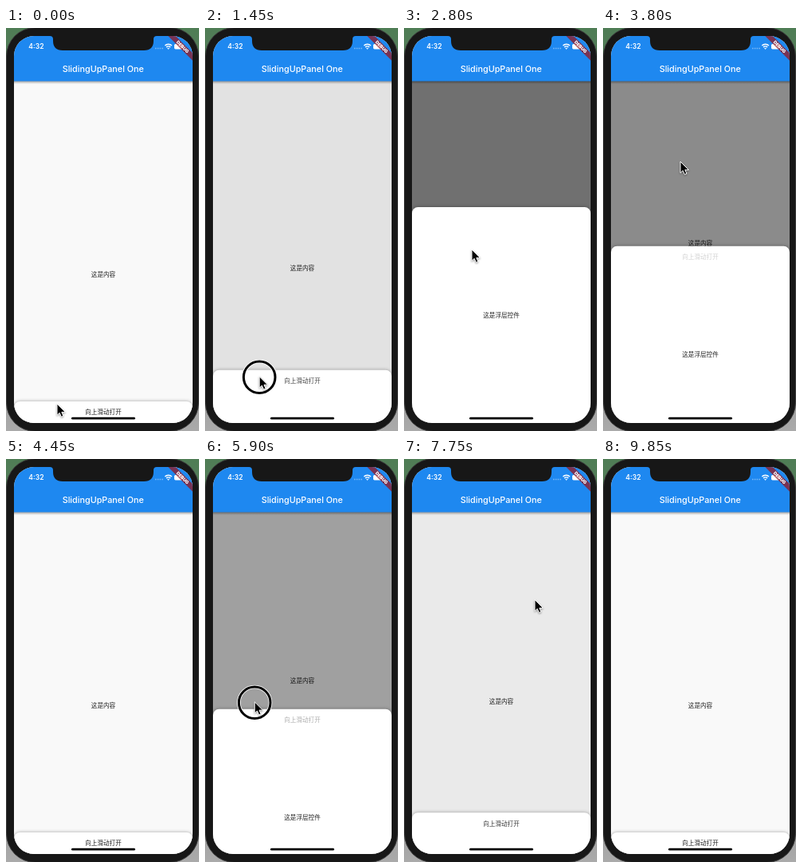
An HTML page that plays this animation: 242 by 504 pixels, repeating every 9.9 s.

```html
<!DOCTYPE html>
<html lang="zh-CN">
<head>
<meta charset="utf-8">
<title>SlidingUpPanel One</title>
<style>
  html, body { margin: 0; width: 100%; height: 100%; overflow: hidden; }
  svg { display: block; width: 242px; height: 504px; }
  text { font: 7.6px "Noto Sans CJK SC", "Noto Sans CJK", sans-serif; fill: #222; text-anchor: middle; }
  .latin { font-family: Inter, sans-serif; fill: #fff; }
  #sheet { filter: drop-shadow(0 0 2px rgba(0, 0, 0, .35)); }
  #arrow { filter: drop-shadow(0 1px 1px rgba(0, 0, 0, .4)); }
</style>
</head>
<body>
<svg viewBox="0 0 242 504">
  <defs>
    <linearGradient id="desk" x2="0" y2="1">
      <stop stop-color="#4f7d55"/><stop offset=".5" stop-color="#777"/><stop offset="1" stop-color="#aaa"/>
    </linearGradient>
    <linearGradient id="shade" x2="0" y2="1">
      <stop stop-opacity=".38"/><stop offset="1" stop-opacity="0"/>
    </linearGradient>
    <clipPath id="screen"><rect x="10" y="10" width="224" height="484" rx="25"/></clipPath>
  </defs>

  <rect width="242" height="504" fill="url(#desk)"/>
  <rect x=".5" y="-.5" width="241" height="505" rx="36" fill="#171717" stroke="#3c3c3c"/>

  <g clip-path="url(#screen)">
    <rect x="10" y="10" width="224" height="484" fill="#f9f9f9"/>
    <text id="content" x="122">这是内容</text>
    <rect id="backdrop" x="10" y="66" width="224" height="428"/>
    <g id="panel">
      <rect id="sheet" x="10" width="224" height="290" rx="7.5" fill="#fff"/>
      <text x="122" y="138">这是浮层控件</text>
      <text id="hint" x="122" y="16.3">向上滑动打开</text>
    </g>

    <rect x="10" y="66" width="224" height="4" fill="url(#shade)"/>
    <rect x="10" y="10" width="224" height="56.5" fill="#1e88f0"/>
    <text class="latin" x="121.8" y="54.9" style="font-size:10.8px;font-weight:500">SlidingUpPanel One</text>
    <text class="latin" x="38" y="26.3" style="font-size:8.6px;font-weight:600">4:32</text>
    <path d="M187 25.5h10" stroke="#fff" stroke-opacity=".4" stroke-width="1.6" stroke-dasharray="1.6 1.2"/>
    <g fill="none" stroke="#fff" stroke-width="1.4">
      <path d="M199.3 22a6 6 0 0 1 8.6 0M201 24a3.7 3.7 0 0 1 5.2 0"/>
      <path d="M202.4 25.3h2.4l-1.2 1.3z" fill="#fff" stroke-width=".5"/>
    </g>
    <rect x="211" y="20" width="11.5" height="6.4" rx="1.6" fill="#fff"/>
    <path d="M223.4 22v2.4" stroke="#fff" stroke-opacity=".6"/>
    <g transform="translate(221.5 23.5) rotate(45)">
      <rect x="-40" y="-3.3" width="80" height="6.6" fill="#8f1f2e" fill-opacity=".8"/>
      <text class="latin" y="2" style="font-size:5.6px;font-weight:900">DEBUG</text>
    </g>
    <rect x="82" y="486.8" width="80" height="2.8" rx="1.4"/>
  </g>
  <path d="M55 9v1q4 0 4 4v2q0 12 12 12h102q12 0 12-12v-2q0-4 4-4V9z" fill="#171717"/>

  <g id="cursor">
    <g id="ring" fill="none">
      <circle cy="1" r="19.8" stroke="#fff" stroke-width="4.6"/>
      <circle cy="1" r="19.8" stroke="#000" stroke-width="3"/>
    </g>
    <path id="arrow" d="M0 0V14.3l3.2-3 2.2 5 2.5-1.1-2.1-4.8h4.6z" stroke="#fff"/>
  </g>
</svg>
<script>
const LOOP = 9900, CLOSED = 467, OPEN = 224;
const el = id => document.getElementById(id);

// Pointer stops: time, x, y
const stops = [
  [0, 64, 470], [900, 64, 470], [1100, 64, 475], [1250, 64, 475],
  [1950, 85, 279], [2300, 85, 277], [2900, 85, 277], [3500, 97, 167],
  [4050, 97, 167], [4380, 92, 510], [5000, 60, 510], [5250, 60, 476],
  [5400, 60, 476], [6150, 63, 244], [6600, 63, 244], [7300, 164, 176],
  [8050, 164, 176], [8500, 170, 296], [9900, 170, 296]
];
const presses = [[1150, 2050], [3600, 3764], [5350, 6150], [7450, 7578]];
const hidden = [[4380, 5000], [8850, LOOP]];

const within = (ranges, t) => ranges.some(([from, to]) => t >= from && t < to);

function pointer(t) {
  const i = stops.findIndex(s => s[0] > t);
  const [t0, x0, y0] = stops[i - 1], [t1, x1, y1] = stops[i];
  const u = (t - t0) / (t1 - t0), e = u * u * (3 - 2 * u);
  return [x0 + (x1 - x0) * e, y0 + (y1 - y0) * e];
}

// Critically damped spring, stiffness 500
function spring(from, to, ms) {
  const k = Math.sqrt(500) * ms / 1000;
  return to + (from - to) * (1 + k) * Math.exp(-k);
}

const drag = (t, offset) => Math.min(CLOSED, pointer(t)[1] + offset);

function panelTop(t) {
  if (t < 1150) return CLOSED;
  if (t < 2050) return drag(t, -8);
  if (t < 3764) return spring(drag(2050, -8), OPEN, t - 2050);
  if (t < 5350) return spring(OPEN, CLOSED, t - 3764);
  if (t < 6150) return drag(t, 9);
  if (t < 7578) return spring(drag(6150, 9), OPEN, t - 6150);
  return spring(OPEN, CLOSED, t - 7578);
}

function draw(now) {
  const t = now % LOOP, top = panelTop(t), [x, y] = pointer(t);
  const shown = (CLOSED - top) / (CLOSED - OPEN);
  el("panel").setAttribute("transform", `translate(0 ${top})`);
  el("content").setAttribute("y", 310.8 - (CLOSED - top) * .2);
  el("backdrop").setAttribute("opacity", 1 - (1 - shown / 2) ** 1.15);
  el("hint").setAttribute("opacity", 1 - shown);
  el("cursor").setAttribute("transform", `translate(${x} ${y})`);
  el("cursor").setAttribute("visibility", within(hidden, t) ? "hidden" : "visible");
  el("ring").setAttribute("opacity", within(presses, t) ? 1 : 0);
  requestAnimationFrame(() => draw(performance.now() - start));
}
const start = performance.now();
draw(0);
</script>
</body>
</html>
```
